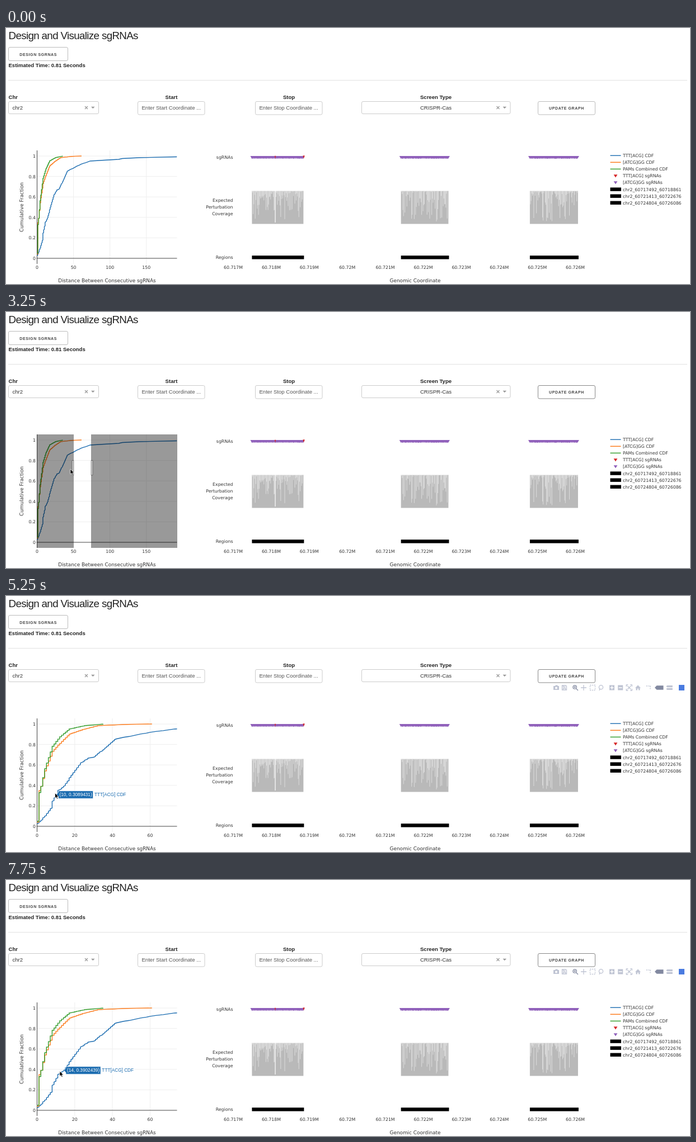
These frames come from a looping animation (1222 px wide and 458 px high, 8000 ms). An HTML page:

```html
<!DOCTYPE html>
<html lang="en">
<head>
<meta charset="utf-8">
<title>sgRNA design</title>
<style>
  html, body { margin: 0; width: 100%; height: 100%; overflow: hidden; background: #fff; }
  svg { display: block; width: 1222px; height: 458px; }
  text { font: 9.55px "Liberation Sans", Arial, sans-serif; fill: #333; white-space: pre; }
  text.title { font-size: 18.8px; letter-spacing: -.66px; fill: #222; }
  text.bold { font-weight: 700; fill: #222; }
  text.button { font-size: 6.97px; font-weight: 700; letter-spacing: .634px; fill: #444; }
  text.tick { font: 7.8px "DejaVu Sans", Verdana, sans-serif; }
  text.axis { font: 8.88px "DejaVu Sans", Verdana, sans-serif; }
  text.tip { font-size: 8.24px; }
</style>
</head>
<body>
<svg id="stage" viewBox="0 0 1222 458"></svg>
<script>
const stage = document.getElementById('stage');
const BLUE = '#1b6cb0', ORANGE = '#fc7a1a', GREEN = '#2f9a28';
const RED = '#d62728', PURPLE = '#9061bb', INK = '#444';
const LEFT = 55.5, RIGHT = 305.5, TOP = 219, BOTTOM = 422;

function add(parent, tag, attrs = {}, content) {
  const node = document.createElementNS('http://www.w3.org/2000/svg', tag);
  for (const key in attrs) node.setAttribute(key, attrs[key]);
  if (content !== undefined) node.textContent = content;
  return parent.appendChild(node);
}
const group = (parent = stage, attrs) => add(parent, 'g', attrs);
const path = (parent, d, attrs) => add(parent, 'path', { d, fill: 'none', ...attrs });
const rect = (parent, x, y, width, height, attrs) =>
  add(parent, 'rect', { x, y, width, height, ...attrs });
const label = (parent, content, x, y, cls = '', anchor = 'start', attrs = {}) =>
  add(parent, 'text', { x, y, class: cls, 'text-anchor': anchor, ...attrs }, content);

function seeded(seed) {
  return () => (seed = (seed * 16807) % 2147483647) / 2147483647;
}

// Linear interpolation through [position, ...values] keys.
function along(keys, at) {
  const next = keys.findIndex(key => key[0] >= at);
  if (next < 0) return keys[keys.length - 1].slice(1);
  if (next === 0) return keys[0].slice(1);
  const [a, b] = [keys[next - 1], keys[next]];
  const part = (at - a[0]) / (b[0] - a[0]);
  return a.slice(1).map((value, i) => value + (b[i + 1] - value) * part);
}

// ---- page controls ----
const box = (x, y, w, h, stroke = '#ccc') =>
  rect(stage, x, y, w, h, { rx: 2.5, fill: '#fff', stroke });

function dropdown(x, w, value, valueX, anchor) {
  box(x, 131.5, w, 22);
  label(stage, value, valueX, 146, '', anchor);
  const end = x + w;
  path(stage, `M${end - 24.5} 140l5 5m0-5l-5 5`, { stroke: '#999', 'stroke-width': 1.2 });
  path(stage, `M${end - 13.5} 140.8h6.6l-3.3 3.4z`, { fill: '#999' });
}

function field(x, name) {
  label(stage, name, x + 60, 127, 'bold', 'middle');
  box(x, 131.5, 119.5, 23.5);
  label(stage, `Enter ${name} Coordinate ...`, x + 7, 146.3, '', 'start', { style: 'fill:#555' });
}

label(stage, 'Design and Visualize sgRNAs', 4.5, 19.5, 'title');
box(4.5, 34.5, 106, 24, '#bbb');
label(stage, 'DESIGN SGRNAS', 24.3, 49.5, 'button');
label(stage, 'Estimated Time: 0.81 Seconds', 4.5, 70, 'bold');
path(stage, 'M4 93.5H1217', { stroke: '#e1e1e1' });
label(stage, 'Chr', 4.5, 127, 'bold');
dropdown(4.5, 161, 'chr2', 11.5, 'start');
field(235.5, 'Start');
field(445.5, 'Stop');
label(stage, 'Screen Type', 768, 127, 'bold', 'middle');
dropdown(635.5, 265.5, 'CRISPR-Cas', 768, 'middle');
const updateButton = box(950.5, 131.5, 102, 23.5, '#bbb');
label(stage, 'UPDATE GRAPH', 1001.5, 146.3, 'button', 'middle');

// ---- genomic tracks ----
const regions = ['chr2_60717492_60718861', 'chr2_60721413_60722676', 'chr2_60724804_60726086'];
const genomeX = position => 406 + (position - 60717000) * .0679;
const marker = (x, y, fill, r = 3.2) =>
  path(stage, `M${x - r} ${y - 2.7}h${2 * r}l${-r} 5.4z`, { fill });

label(stage, 'sgRNAs', 405.5, 233.8, 'tick', 'end');
['Expected', 'Perturbation', 'Coverage'].forEach((word, i) =>
  label(stage, word, 405.5, 311 + 12.1 * i, 'tick', 'end'));
label(stage, 'Regions', 405.5, 413, 'tick', 'end');

const random = seeded(4127);
regions.forEach(name => {
  const [start, end] = name.split('_').slice(1).map(genomeX);
  for (let x = start; x < end - 1; x += 1 + random() * 1.2) marker(x, 231.6, PURPLE, 2.9);

  rect(stage, start, 291.5, end - start - 1, 59, { fill: '#b9b9b9' });
  let notches = '';
  for (let x = start + 1; x < end - 2; x += 1.2) {
    notches += `M${x.toFixed(1)} 291v${(1 + 54 * random() ** 1.8).toFixed(1)}`;
  }
  path(stage, notches, { stroke: '#fff', 'stroke-width': .5 });
  rect(stage, start, 407.2, end - start, 6.4, { fill: '#000' });
});
path(stage, 'M481 291v57', { stroke: '#fff', 'stroke-width': 1.2 });
marker(481, 231.4, RED, 1.1);
marker(532, 230.9, RED, 1.7);
for (let i = 0; i < 10; i++) {
  label(stage, `${+(60.717 + i / 1000).toFixed(3)}M`, 406 + 67.9 * i, 430.8, 'tick', 'middle');
}
label(stage, 'Genomic Coordinate', 731, 455, 'axis', 'middle');

// ---- legend ----
['TTT[ACG] CDF', '[ATCG]GG CDF', 'PAMs Combined CDF', 'TTT[ACG] sgRNAs', '[ATCG]GG sgRNAs', ...regions]
  .forEach((name, i) => {
    const y = 228.2 + 12.08 * i;
    if (i < 3) path(stage, `M1079.5 ${y}h19`, { stroke: [BLUE, ORANGE, GREEN][i], 'stroke-width': 1.4 });
    else if (i < 5) marker(1089, y + .4, i === 3 ? RED : PURPLE, 3.4);
    else rect(stage, 1079.5, y - 3.2, 19.5, 6.4, { fill: '#000' });
    label(stage, name, 1102, y + 2.9, 'tick');
  });

// ---- cumulative chart ----
const toY = fraction => 412 - 183 * fraction;

// Ranks advance at whole distances along a broken line of [distance, fraction].
function makeTrace(name, color, text, count, keys) {
  const points = [];
  let last = 0;
  for (let x = 0; x <= keys[keys.length - 1][0]; x++) {
    const rank = Math.floor(count * along(keys, x)[0] + 1e-6);
    if (rank > last) points.push({ x, rank, before: last });
    last = rank;
  }
  return { name, color, text, count, points };
}

const traces = [
  makeTrace('TTT[ACG] CDF', BLUE, '#fff', 123, [[0, .028], [4, .1], [7, .175], [8, .244], [11, .35],
    [14, .391], [17, .472], [23, .62], [27, .667], [30, .675], [33, .724], [41, .85], [50, .886],
    [60, .92], [73, .952], [113, .968], [117, .976], [140, .984], [192, .992]]),
  makeTrace('[ATCG]GG CDF', ORANGE, INK, 531, [[0, .04], [1, .35], [2, .39], [4, .542], [8, .732],
    [11, .793], [17, .902], [24, .946], [32, .984], [48, .997], [61, 1]]),
  makeTrace('PAMs Combined CDF', GREEN, '#fff', 654, [[0, .05], [1, .33], [2, .39], [4, .563],
    [8, .782], [12, .876], [17, .952], [25, .984], [35, 1]])
];

const clip = add(add(stage, 'defs'), 'clipPath', { id: 'plot' });
rect(clip, LEFT - 1, TOP, RIGHT - LEFT + 1, BOTTOM - TOP);

const curve = ({ points, count }, scale) => points.map(({ x, rank, before }, i) => {
  const y = toY((i ? before + 1 : rank) / count);
  return `${i ? 'L' : 'M'}${LEFT + x * scale} ${y}V${toY(rank / count)}`;
}).join('');

function chart(scale, interval) {
  const g = group();
  for (let i = 1; i < 6; i++) path(g, `M${LEFT} ${toY(i / 5)}H${RIGHT}`, { stroke: '#eee' });
  for (let x = 0; LEFT + x * scale < RIGHT; x += interval) {
    const px = LEFT + x * scale;
    path(g, `M${px} ${TOP}V${BOTTOM}`, { stroke: x ? '#eee' : INK });
    label(g, x, px, 430.8, 'tick', 'middle');
  }
  path(g, `M${LEFT - 1} 412H${RIGHT}`, { stroke: INK });
  const lines = group(g, { 'clip-path': 'url(#plot)' });
  traces.forEach(trace =>
    path(lines, curve(trace, scale), { stroke: trace.color, 'stroke-width': 1.4 }));
  return { g, scale };
}

for (let i = 0; i < 6; i++) label(stage, i / 5, 53, toY(i / 5) + 2.9, 'tick', 'end');
label(stage, 'Distance Between Consecutive sgRNAs', 180.5, 455, 'axis', 'middle');
label(stage, 'Cumulative Fraction', 0, 0, 'axis', 'middle', { transform: 'translate(31 320.5) rotate(-90)' });
const wide = chart(1.302, 50), close = chart(3.365, 20);

// ---- toolbar ----
const toolbar = group();
const DIM = '#bfc4d3', LIT = '#8289a0';
const place = x => ({ transform: `translate(${x} 164)` });
const outline = (x, d, stroke = DIM) => path(toolbar, d, { ...place(x), stroke, 'stroke-width': 1.3 });
const solid = (x, d, fill = DIM) => path(toolbar, d, { ...place(x), fill, 'fill-rule': 'evenodd' });
const ring = (x, y, r, stroke) =>
  add(toolbar, 'circle', { ...place(x), cy: y, r, fill: 'none', stroke, 'stroke-width': 1.3 });

solid(983, 'M-5-3h3l1-1.5h3l1 1.5h2v7h-10zM-2 .5a2 2 0 1 0 4 0a2 2 0 1 0-4 0');
outline(997.5, 'M-4-4H2.5L4-2.5V4H-4zM-2-4v2.5h4M-2 4V1h4v3');
ring(1016.2, -1, 3.2, LIT);
outline(1017, 'M1.5 1.5L5 5M-2.3-1h3M-.8-2.5v3', LIT);
outline(1032, 'M-5 0H5M0-5V5');
outline(1048, 'M-4.5-4.5h9v9h-9z').setAttribute('stroke-dasharray', '2 1.6');
ring(1063, -.8, 3.6, DIM);
outline(1061, 'M0 2l-1 3');
solid(1082.5, 'M-4.5-4.5h9v9h-9zM-3-.7v1.4h2.3V3H.7V.7H3V-.7H.7V-3H-.7v2.3z');
solid(1097.7, 'M-4.5-4.5h9v9h-9zM-3-.7v1.4h6v-1.4z');
for (let turn = 0; turn < 360; turn += 90) {
  path(toolbar, 'M-5-2V-5h3M0 0l-3-3', {
    transform: `translate(1113.3 164) rotate(${turn})`, stroke: DIM, 'stroke-width': 1.3
  });
}
solid(1129, 'M-5 .5L0-4.5L5 .5H3.5V4.5H1V1.5H-1V4.5H-3.5V.5z');
outline(1148, 'M-4-3H4M3-3V4').setAttribute('stroke-dasharray', '2 1.6');
solid(1167, 'M-8 0L-4.5-3.8H7.5V3.8H-4.5z', LIT);
solid(1185.3, 'M-6-2.3L-4-4H5.5V-.7H-4zM-6 2.3L-4 .7H5.5V4H-4z');
rect(toolbar, 1202, 159, 10, 10, { fill: '#4a7be0' });

// ---- overlays ----
const shade = path(stage, '', { fill: '#000', 'fill-opacity': .4 });
const handles = path(stage, '', { fill: '#fff', stroke: INK, 'stroke-width': .8 });
const tip = group();
const cursor = path(stage, 'M0 0V9.2L2.1 7.3L3.6 10.6L5.2 9.9L3.8 6.7H6.6z',
  { fill: '#000', stroke: '#fff', 'stroke-width': .7 });

function nearestPoint([mouseX, mouseY], scale) {
  let best = { distance: 20 };
  for (const trace of traces) {
    for (const { x, rank } of trace.points) {
      const px = LEFT + x * scale, py = toY(rank / trace.count);
      const distance = Math.hypot(px - mouseX, py - mouseY);
      if (distance < best.distance) best = { distance, trace, x, px, py, value: rank / trace.count };
    }
  }
  return best;
}

function showTip({ trace, x, px, py, value }, digits) {
  const { name, color, text } = trace;
  const frame = path(tip, '', { fill: color, stroke: text, 'stroke-width': .7 });
  const main = label(tip, `(${x}, ${+value.toFixed(digits)})`, px + 6.4, py + 2.9, 'tip', 'start',
    { style: `fill:${text}` });
  const end = px + 8.4 + main.getComputedTextLength();
  frame.setAttribute('d',
    `M${px + .5} ${py}l3.8-3.8V${py - 6.8}H${end}V${py + 6.8}H${px + 4.3}V${py + 3.8}z`);
  const back = rect(tip, end, py - 6.8, 0, 13.6, { fill: '#fff', 'fill-opacity': .85 });
  const side = label(tip, name, end + 2.2, py + 2.9, 'tip', 'start', { style: `fill:${color}` });
  back.setAttribute('width', side.getComputedTextLength() + 4.4);
}

function showDrag(edge) {
  const bar = x => `M${x} 265.5h2.4v26.5h-2.4z`;
  const span = (a, b) => `M${a} ${TOP}H${b}V${BOTTOM}H${a}z`;
  shade.setAttribute('d', edge ? span(LEFT, edge) + span(152, RIGHT + .5) : '');
  handles.setAttribute('d', edge ? bar(edge - 2.6) + bar(152.3) : '');
}

// ---- motion: [seconds, x, y] turning points of the cursor ----
const route = [
  [.75, 275, 2], [1.5, 985, 141], [1.75, 985, 141], [2, 640, 78], [2.21, 238, 232], [2.25, 201, 227.5],
  [3, 152, 279], [3.5, 78, 283], [3.75, 52, 286], [4, 52, 286], [4.21, 156, 288], [4.25, 52, 286],
  [4.5, 84, 312], [5, 82, 362], [5.5, 93, 343], [5.75, 72, 295], [6, 97, 262.5], [6.5, 210, 229],
  [7, 218, 240], [7.25, 156, 287], [7.75, 96, 342]
];
const LAG = .04; // the chart reacts to a slightly older cursor position
const show = (node, visible) => node.setAttribute('visibility', visible ? 'visible' : 'hidden');

function draw(time) {
  const [x, y] = along(route, time), felt = along(route, time - LAG);
  const zoomed = time > 4, dragging = time > 3 && !zoomed;
  const view = zoomed ? close : wide;
  show(wide.g, !zoomed);
  show(close.g, zoomed);
  show(toolbar, !dragging && x > LEFT && y > 158);
  show(cursor, time >= route[0][0]);
  cursor.setAttribute('transform', `translate(${x} ${y})`);
  updateButton.setAttribute('stroke', time >= 1.5 ? '#888' : '#bbb');
  showDrag(dragging && Math.max(LEFT, felt[0]));
  tip.replaceChildren();
  const target = nearestPoint(felt, view.scale);
  if (target.trace && !dragging) showTip(target, zoomed ? 7 : 5);
}

const began = performance.now();
let shown;
function tick() {
  const time = Math.floor(((performance.now() - began) % 8000) / 250) / 4;
  if (time !== shown) draw(shown = time);
  requestAnimationFrame(tick);
}
tick();
</script>
</body>
</html>
```
